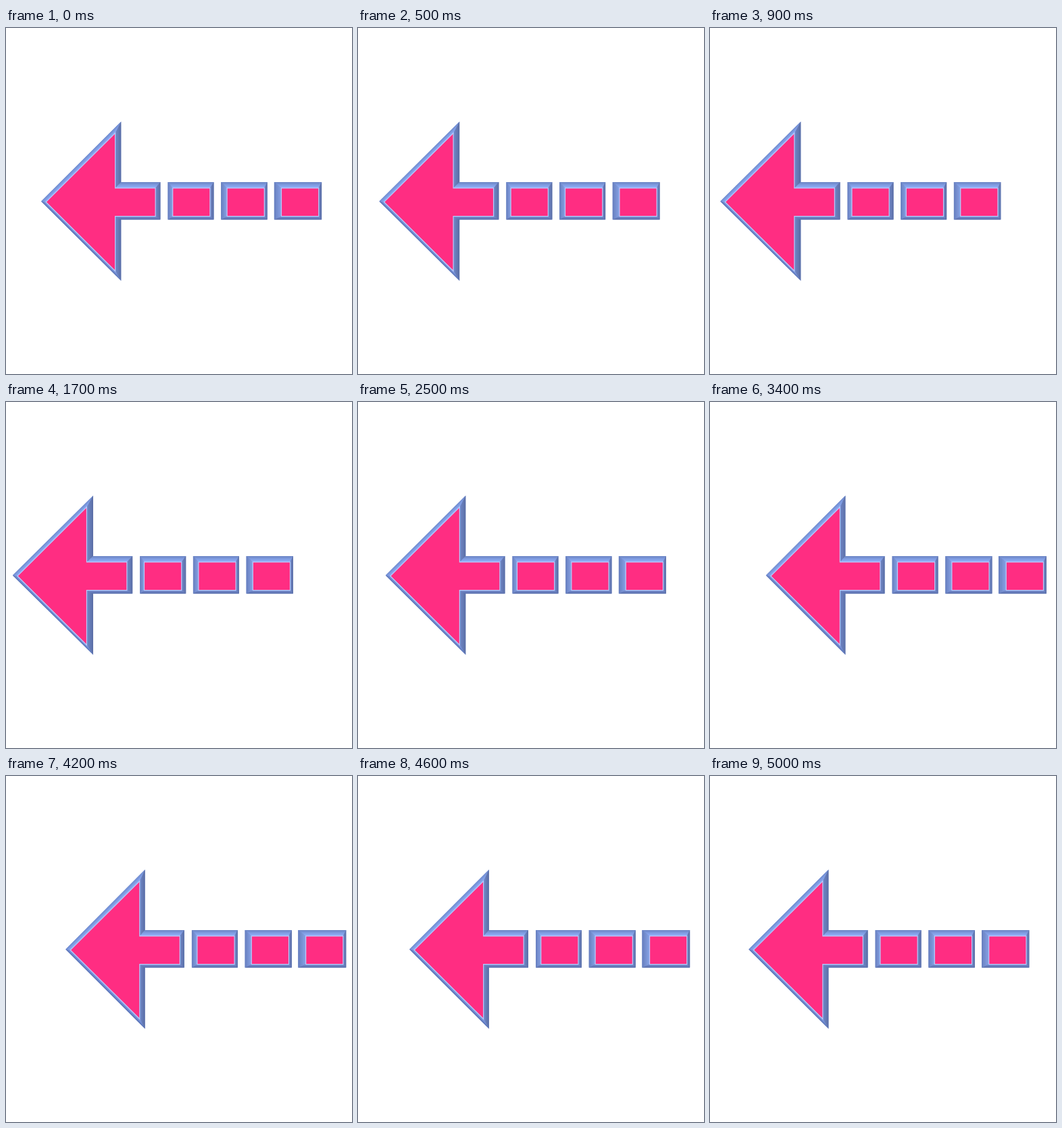
An HTML page with a canvas that plays this animation: 512 by 512 pixels, repeating every 5100 ms.

```html
<!DOCTYPE html>
<html lang="en">
<head>
<meta charset="utf-8">
<title>Sliding arrow</title>
<style>
  html, body { margin: 0; width: 100%; height: 100%; overflow: hidden; background: #fff; }
  canvas { display: block; width: 100vmin; height: 100vmin; }
</style>
</head>
<body>
<canvas id="stage" width="512" height="512"></canvas>
<script>
const ctx = document.getElementById('stage').getContext('2d');
const LOOP = 5100, STEP = 100, STEPS = 50, SWING = 42;
const PINK = '#ff2d82', RIM = '#bac9fa';

// Bevel colours from the outer edge to the face
const SHADES = {
  top:   [[112, 138, 202], [146, 178, 253]],
  left:  [[106, 130, 194], [134, 162, 228]],
  right: [[92, 112, 168], [112, 136, 200]],
  base:  [[84, 104, 164], [122, 148, 216]],
  upper: [[116, 144, 212], [142, 176, 250]],
  lower: [[90, 116, 184], [136, 166, 238]]
};
const BANDS = 5;

// Perspective: the rim slides slightly less than the face in front of it
const rimLeft = x => x - 7 - 0.0214 * (x - 210);
const rimRight = x => x + 5 + Math.max(0, 355 - x) * 0.022;

const mix = (a, b, k) => a + (b - a) * k;

function trace(points) {
  ctx.beginPath();
  points.forEach(([x, y]) => ctx.lineTo(x, y));
  ctx.closePath();
}

function fill(points, color) {
  trace(points);
  ctx.fillStyle = color;
  ctx.fill();
}

function solid(face, rim, sides) {
  fill(rim, '#7690d2');
  const ring = k => rim.map(([x, y], i) => [mix(x, face[i][0], k), mix(y, face[i][1], k)]);
  for (let b = 0; b < BANDS; b++) {
    const a = ring(b / BANDS);
    const c = ring(Math.min(1, (b + 1.15) / BANDS));
    sides.forEach((side, i) => {
      const j = (i + 1) % rim.length;
      const [from, to] = SHADES[side];
      const rgb = from.map((v, n) => Math.round(mix(v, to[n], b / (BANDS - 1))));
      fill([a[i], a[j], c[j], c[i]], `rgb(${rgb})`);
    });
  }
  trace(face);
  ctx.lineWidth = 2.4;
  ctx.lineJoin = 'miter';
  ctx.strokeStyle = RIM;
  ctx.stroke();
  fill(face, PINK);
}

function arrow(s) {
  const tip = 60 + s, back = 161 + s, tail = 220.5 + s;
  const backRim = rimRight(back), tailRim = rimRight(tail);
  const shape = (t, b, e, [mid, top, y1, y2, low]) => [
    [t, mid], [b, top], [b, y1], [e, y1], [e, y2], [b, y2], [b, low]
  ];
  solid(
    shape(tip, back, tail, [257.5, 157, 237.5, 278, 358]),
    shape(tip - 8, backRim, tailRim, [256.5, 138.5, 228, 283.5, 374]),
    ['upper', 'right', 'top', 'right', 'base', 'right', 'lower']
  );
}

function block(x) {
  const box = (l, r, t, b) => [[l, t], [r, t], [r, b], [l, b]];
  solid(
    box(x, x + 54, 237.5, 278),
    box(rimLeft(x), rimRight(x + 54), 228, 283.5),
    ['top', 'right', 'base', 'left']
  );
}

function draw(ms) {
  const n = Math.max(0, Math.floor(ms / STEP) - 1);
  const s = -3 - SWING * Math.sin(2 * Math.PI * (n - 0.57) / STEPS);
  ctx.fillStyle = '#fff';
  ctx.fillRect(0, 0, 512, 512);
  arrow(s);
  for (let i = 0; i < 3; i++) block(247.3 + 80.4 * i + s);
}

const start = performance.now();
function tick() {
  draw((performance.now() - start) % LOOP);
  requestAnimationFrame(tick);
}
tick();
</script>
</body>
</html>
```
